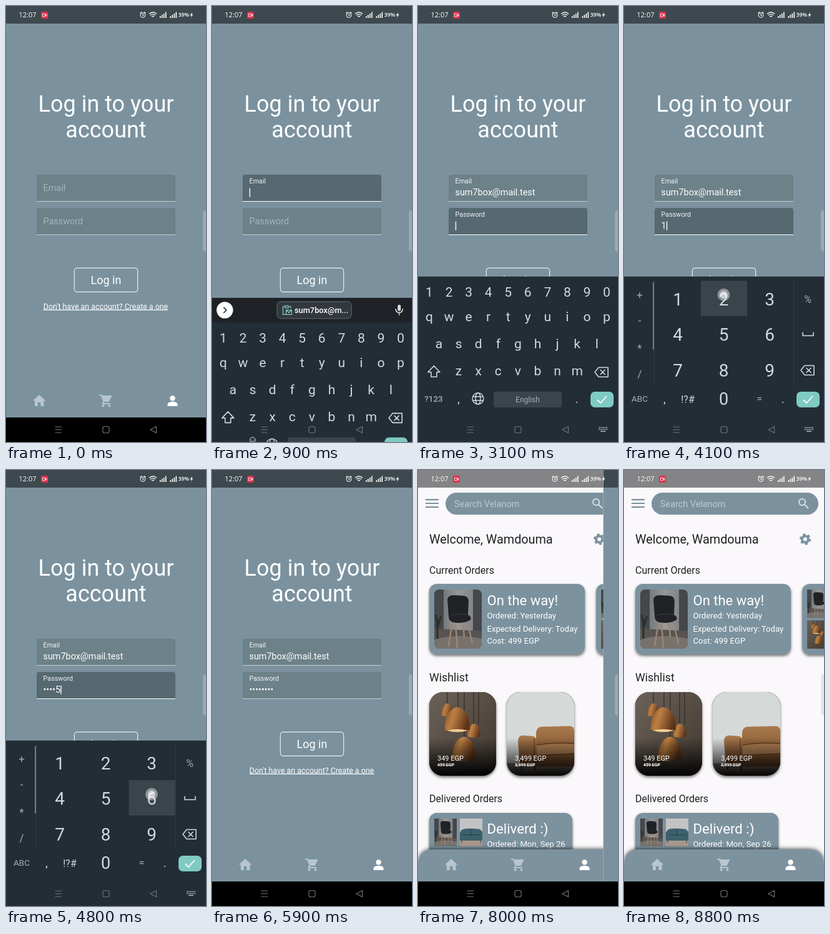
Write an HTML page that moves like this. It is 320x693 px and loops after 8.9 s.

```html
<!DOCTYPE html>
<html lang="en">
<head>
<meta charset="utf-8">
<title>Login flow</title>
<style>
  html, body { margin: 0; width: 100%; height: 100%; overflow: hidden; background: #000; }
  svg#stage { display: block; width: 100%; height: 100%; font-family: Roboto, sans-serif; }
  .mid { text-anchor: middle; }
  .key { text-anchor: middle; fill: #d3d9dd; }
  .dim { fill: #a4adb2; }
  .line { fill: none; stroke: #d3d9dd; stroke-width: 1.6; stroke-linejoin: round; stroke-linecap: round; }
</style>
</head>
<body>
<svg id="stage" viewBox="0 0 320 693" xmlns="http://www.w3.org/2000/svg">
  <defs>
    <clipPath id="wipe"><rect id="wipeRect" width="0" height="654"/></clipPath>
    <clipPath id="buttonClip"><rect x="109" y="416.500" width="102" height="38" rx="4"/></clipPath>
    <clipPath id="photoA"><rect x="26" y="190" width="76" height="94" rx="8"/></clipPath>
    <clipPath id="wishA"><rect x="18" y="353" width="107" height="133" rx="22"/></clipPath>
    <clipPath id="wishB"><rect x="142" y="353" width="108" height="133" rx="22"/></clipPath>
    <filter id="shadow" x="-20%" y="-20%" width="140%" height="140%">
      <feDropShadow dx="0" dy="2.500" stdDeviation="2.200" flood-opacity=".55"/>
    </filter>
    <filter id="navShadow" x="-10%" y="-40%" width="120%" height="180%">
      <feDropShadow dx="0" dy="-1" stdDeviation="3" flood-opacity=".65"/>
    </filter>
    <linearGradient id="fade" x2="0" y2="1">
      <stop offset=".55" stop-opacity="0"/><stop offset="1" stop-opacity=".95"/>
    </linearGradient>
    <linearGradient id="brown" x2="1" y2="1">
      <stop stop-color="#6c625a"/><stop offset="1" stop-color="#40372f"/>
    </linearGradient>
    <linearGradient id="copper" x2="1" y2=".3">
      <stop stop-color="#80501f"/><stop offset=".4" stop-color="#bd8044"/><stop offset="1" stop-color="#5e3418"/>
    </linearGradient>
    <linearGradient id="leather" x2="0" y2="1">
      <stop stop-color="#a97a4d"/><stop offset="1" stop-color="#6f4526"/>
    </linearGradient>
    <linearGradient id="wall" x2="1">
      <stop stop-color="#606367"/><stop offset=".5" stop-color="#96989a"/><stop offset="1" stop-color="#77797c"/>
    </linearGradient>
    <path id="lamp" d="M-20 17C-21 -3 -12 -18 0 -19C12 -18 21 -3 20 17Q0 24 -20 17Z"/>
    <symbol id="chair" viewBox="0 0 76 94" preserveAspectRatio="xMidYMid slice">
      <rect width="76" height="94" fill="url(#wall)"/>
      <path d="M0 0H15V64H0ZM62 0H76V66H62Z" fill="#45474b"/>
      <path d="M0 62L76 66V94H0Z" fill="#575452"/>
      <path d="M0 80Q30 69 76 78V94H0Z" fill="#78726d"/>
      <path d="M5 78V46M5 60L11 42M6 56L2 40" stroke="#29302c" stroke-width="3"/>
      <path d="M29 52L23 90M34 54L37 93M53 52L61 86M46 53L48 76" stroke="#a08570" stroke-width="2.400"/>
      <path d="M21 16Q22 8 33 9L48 10Q55 11 55 20L54 40Q60 43 58 48Q48 55 30 52Q23 50 23 42Z" fill="#202225"/>
      <path d="M28 41Q39 37 54 40" stroke="#3d4043" fill="none"/>
    </symbol>
    <symbol id="lamps" viewBox="0 0 107 133" preserveAspectRatio="xMidYMid slice">
      <rect width="107" height="133" fill="url(#brown)"/>
      <path d="M29 0V20M46 0V26M56 0V75M71 0V52M79 0V52" stroke="#292320"/>
      <g fill="url(#copper)">
        <use href="#lamp" transform="translate(29 28) scale(.46 .53)"/>
        <use href="#lamp" transform="translate(71.500 61) scale(.52 .56)"/>
        <use href="#lamp" transform="translate(55.500 90) scale(.94 1)"/>
        <use href="#lamp" transform="translate(45 43)"/>
      </g>
      <path d="M28 61Q45 66 62 61Q45 57 28 61Z" fill="#f0cd98"/>
    </symbol>
    <symbol id="sofa" viewBox="0 0 108 133" preserveAspectRatio="xMidYMid slice">
      <rect width="108" height="133" fill="#d5d9d8"/>
      <rect y="113" width="108" height="20" fill="#8b8179"/>
      <path d="M47 64Q48 55 57 55L100 54Q107 54 108 60V118H45Z" fill="url(#leather)"/>
      <path d="M46 85Q78 80 108 83V97Q78 98 46 100Z" fill="#ae7f52"/>
      <path d="M18 78Q18 68 28 69L42 70Q49 72 48 84V117H21Z" fill="url(#leather)"/>
      <path d="M48 84Q78 79 108 82M47 101L108 98M44 74V115" stroke="#5b391f" stroke-width="1.200" fill="none"/>
      <path d="M24 117V123M45 117V125" stroke="#2c211b" stroke-width="2"/>
    </symbol>
    <symbol id="blueSofa" viewBox="0 0 36 44">
      <rect width="36" height="44" fill="#c2c4c3"/><rect y="30" width="36" height="14" fill="#a8988c"/>
      <path d="M3 18Q9 14 32 17L36 21V35H0V22Z" fill="#3e606d"/>
      <path d="M4 26H33M18 18V26M3 35V39M33 35V39" stroke="#243f49"/>
    </symbol>
    <g id="backspace" class="line"><path d="M-11 0L-5 -7.500H10V7.500H-5ZM-2 -3.500L5 3.500M5 -3.500L-2 3.500"/></g>
    <g id="enter"><rect x="276" y="613" width="37" height="25" rx="7" fill="#7fcac3"/>
      <path d="M287 626L292 631L302 620" fill="none" stroke="#fff" stroke-width="1.800"/></g>
  </defs>

  <rect width="320" height="693" fill="#000"/>
  <g id="login">
    <rect width="320" height="654" fill="#7b929e"/>
    <rect width="320" height="28" fill="#3d494f"/>
    <g class="mid" fill="#fff">
      <text x="160" y="168" font-size="36">Log in to your</text>
      <text x="160" y="209" font-size="36">account</text>
      <text x="160" y="442" font-size="18">Log in</text>
      <text x="159.500" y="481.500" font-size="12.400" text-decoration="underline">Don't have an account? Create a one</text>
    </g>
    <g id="fields"></g>
    <g clip-path="url(#buttonClip)"><circle id="ripple" cx="160" cy="436" fill="#fff"/></g>
    <rect x="109.300" y="416.500" width="101.400" height="38" rx="4" fill="none" stroke="#fff"/>
  </g>

  <g id="home" clip-path="url(#wipe)">
    <rect width="320" height="654" fill="#faf8fa"/>
    <rect width="320" height="28" fill="#848385"/>
    <path d="M12 47.200H33M12 53H33M12 58.800H33" stroke="#7b929e" stroke-width="2.200"/>
    <rect x="44" y="36" width="267" height="35" rx="17.500" fill="#7b929e"/>
    <text x="58" y="58.500" font-size="14.400" fill="#bccad1">Search Velanom</text>
    <g fill="none" stroke="#d6dfe3" stroke-width="2"><circle cx="285" cy="51" r="5"/><path d="M289 55L295 61"/></g>
    <g fill="#202024">
      <text x="18" y="117" font-size="19.800">Welcome, Wamdouma</text>
      <text x="18" y="164.500" font-size="16">Current Orders</text>
      <text x="18" y="336" font-size="17.800">Wishlist</text>
      <text x="18" y="528" font-size="16">Delivered Orders</text>
    </g>
    <g transform="translate(290 110)" fill="none" stroke="#7b929e">
      <circle r="5" stroke-width="4"/><circle r="7.600" stroke-width="3" stroke-dasharray="4 3.960"/>
    </g>
    <g fill="#7b929e" filter="url(#shadow)">
      <rect x="18" y="181" width="249" height="112" rx="12"/>
      <rect x="285" y="181" width="249" height="112" rx="12"/>
      <rect x="18" y="545" width="229" height="112" rx="12"/>
    </g>
    <g clip-path="url(#photoA)"><use href="#chair" x="26" y="190" width="76" height="94"/></g>
    <use href="#chair" x="293" y="190" width="36" height="45"/>
    <use href="#lamps" x="293" y="239" width="36" height="45"/>
    <use href="#chair" x="26" y="554" width="36" height="44"/>
    <use href="#blueSofa" x="67" y="554" width="36" height="44"/>
    <g fill="#fff" font-size="13.150">
      <text x="110.500" y="215" font-size="22">On the way!</text>
      <text x="110.500" y="236">Ordered: Yesterday</text>
      <text x="110.500" y="256.500">Expected Delivery: Today</text>
      <text x="110.500" y="276">Cost: 499 EGP</text>
      <text x="110.500" y="578" font-size="22.200">Deliverd :)</text>
      <text x="110.500" y="599">Ordered: Mon, Sep 26</text>
    </g>
    <g filter="url(#shadow)">
      <rect x="18" y="353" width="107" height="133" rx="22"/>
      <rect x="142" y="353" width="108" height="133" rx="22"/>
    </g>
    <g clip-path="url(#wishA)">
      <use href="#lamps" x="18" y="353" width="107" height="133"/>
      <rect x="18" y="353" width="107" height="133" fill="url(#fade)"/>
    </g>
    <g clip-path="url(#wishB)">
      <use href="#sofa" x="142" y="353" width="108" height="133"/>
      <rect x="142" y="353" width="108" height="133" fill="url(#fade)"/>
    </g>
    <g fill="#fff" font-size="11">
      <text x="31" y="462">349 EGP</text><text x="155" y="462">3,499 EGP</text>
      <g font-size="7" font-weight="500" text-decoration="line-through">
        <text x="31" y="471">459 EGP</text><text x="155" y="471">3,999 EGP</text>
      </g>
    </g>
    <path d="M0 654V628Q0 603 25 603H295Q320 603 320 628V654Z" fill="#7b929e" filter="url(#navShadow)"/>
  </g>

  <g fill="#b9c6cd">
    <path d="M53 618L43 627.500H46V636H51V630H55.500V636H60.500V627.500H63.500Z"/>
    <path d="M149 618.500H152.500L156.500 628H164L168 620H153.500" fill="none" stroke="#b9c6cd" stroke-width="2"/>
    <path d="M154 620H168.500L164.500 628H157.500Z"/>
    <path d="M156.500 628L154.500 632H167" fill="none" stroke="#b9c6cd" stroke-width="2"/>
    <circle cx="155.500" cy="635.500" r="2"/><circle cx="165.500" cy="635.500" r="2"/>
    <g fill="#fff"><circle cx="266.500" cy="623.500" r="4.200"/><path d="M258.500 636V633Q259 629 266.500 629Q274 629 274.500 633V636Z"/></g>
  </g>

  <g fill="#fff" font-family="'Open Sans', sans-serif">
    <text x="20.500" y="18" font-size="11">12:07</text>
    <text x="275.500" y="17" font-size="8.800" font-weight="600">39%</text>
    <rect x="56" y="9" width="11" height="11" rx="2.500" fill="#e5304a"/>
    <path d="M58.500 12.500H62.500V16.500H58.500ZM63 14L65 12.800V16.200L63 15Z" fill="none" stroke="#fff" stroke-width=".8"/>
    <g fill="none" stroke="#fff" stroke-width="1.100">
      <circle cx="219" cy="14.500" r="3.800"/><path d="M219 12V15H221M214.500 11.500L217 9.500M223.500 11.500L221 9.500"/>
      <path d="M229 12.500Q235 7.500 241 12.500M231 14.800Q235 11.500 239 14.800M233 17Q235 15.500 237 17" stroke-width="1.400"/>
    </g>
    <path id="bars" d="M246 16h1.600v3h-1.600zM249 14h1.600v5h-1.600zM252 12h1.600v7h-1.600zM255 9.500h1.600v9.500h-1.600z"/>
    <use href="#bars" x="16.500"/>
    <path d="M298 9.500L294.500 15H296.800L295.600 19L299.300 13.300H297Z"/>
  </g>
  <rect x="315" y="325" width="10" height="65" rx="4" fill="#c3cbd0" opacity=".42"/>

  <g id="keyboard">
    <g id="toolbar">
      <rect y="391" width="320" height="40" fill="#1e2227"/>
      <circle cx="20.500" cy="410.500" r="13.200" fill="#fff"/>
      <path d="M18.500 406L23 410.500L18.500 415" fill="none" stroke="#33393e" stroke-width="1.800"/>
      <g id="chip">
        <rect x="104" y="397" width="119" height="27" rx="6" fill="#32383e" stroke="#646b70"/>
        <path d="M117 405H113.500V417.500H118M123 405H126V408M117 403.500H122V407H117ZM118.500 410.500H127.500V417.500H118.500ZL123 414.500L127.500 410.500" fill="none" stroke="#7fcac3" stroke-width="1.300"/>
        <text x="132" y="415.500" font-size="12.800" font-weight="500" fill="#fff">sum7box@m...</text>
      </g>
      <rect x="297" y="402" width="5" height="10" rx="2.500" fill="#d3d9dd"/>
      <path d="M294 409Q294.500 414.500 299.500 414.500Q304.500 414.500 305 409M299.500 414.500V418" class="line"/>
    </g>
    <rect y="430" width="320" height="263" fill="#222d35"/>
    <g id="letters">
      <path d="M25.500 572L16 582H21V589.500H30V582H35Z" class="line"/>
      <use href="#backspace" x="294" y="582"/>
      <text class="key dim" x="25" y="629" font-size="13.500" font-weight="500">?123</text>
      <text id="comma" class="key" x="65" font-size="18">,</text>
      <g id="smiley" fill="none" stroke="#d3d9dd" stroke-linecap="round"><circle cx="65" cy="617" r="4.500"/><path d="M63 616V615.800M67 616V615.800M62.800 618.500Q65 620.500 67.200 618.500"/></g>
      <g class="line" style="stroke-width:1.400"><circle cx="96" cy="624" r="9"/><ellipse cx="96" cy="624" rx="4" ry="9"/><path d="M88 621H104M88 627H104"/></g>
      <rect x="121" y="613" width="109" height="25" rx="3" fill="#3a444b"/>
      <text class="key dim" x="175.500" y="630" font-size="12">English</text>
      <text class="key" x="254" y="631" font-size="18">.</text>
    </g>
    <g id="numpad">
      <path d="M48.500 436V603M271.500 436V603" stroke="#303b43"/>
      <path d="M47 439V546" stroke="#727b81" stroke-width="2"/>
      <rect id="pressed" width="74" height="56" fill="#3a444b"/>
      <path d="M286 519V524H303V519" class="line"/>
      <use href="#backspace" x="294" y="579"/>
    </g>
    <use href="#enter"/>
    <path d="M289 670H303M289 673H303" stroke="#8d969b" stroke-width="2" stroke-dasharray="2 1"/>
    <path d="M292 676H300" stroke="#8d969b" stroke-width="2"/>
  </g>
  <g fill="none" stroke="#6d7377" stroke-width="1.200">
    <path d="M78.500 669H89M78.500 673.500H89M78.500 678H89"/>
    <rect x="155" y="668.500" width="10" height="10" rx="2.500"/>
    <path d="M231 673.500L240.500 668.500V678.500Z"/>
  </g>
  <g id="touch"><circle r="10" fill="#dfe4e7" opacity=".5"/><circle r="6" fill="#fff" opacity=".55"/></g>
</svg>
<script>
const LOOP = 8900;
const EMAIL = "sum7box@mail.test";
const SVG = "http://www.w3.org/2000/svg";
const $ = id => document.getElementById(id);
const show = (el, on) => el.setAttribute("visibility", on ? "inherit" : "hidden");
const within = (t, a, b) => t >= a && t < b;
const progress = (t, a, b) => Math.min(1, Math.max(0, (t - a) / (b - a)));
const easeOut = u => 1 - (1 - u) ** 3;

function add(parent, tag, attrs, text = "") {
  const el = parent.appendChild(document.createElementNS(SVG, tag));
  for (const name in attrs) el.setAttribute(name, attrs[name]);
  el.textContent = text;
  return el;
}

function keyRow(parent, chars, x, step, y, size = 21) {
  [...chars].forEach((c, i) => add(parent, "text", { class: "key", x: x + i * step, y, "font-size": size }, c));
}

keyRow($("letters"), "1234567890", 18, 31.55, 462);
keyRow($("letters"), "qwertyuiop", 18, 31.55, 501);
keyRow($("letters"), "asdfghjkl", 33.5, 31.6, 544);
keyRow($("letters"), "zxcvbnm", 65, 31.6, 587);
["123", "456", "789"].forEach((row, i) => keyRow($("numpad"), row, 86, 73.5, 476 + 56.3 * i, 28));
keyRow($("numpad"), "0", 159.5, 0, 634, 27);
for (const [label, x, y, size] of [
  ["+", 25, 465, 17], ["-", 25, 506, 17], ["*", 25, 550, 17], ["/", 25, 591, 17],
  ["%", 294, 472, 16], ["ABC", 25, 629, 13.5], ["=", 217, 630, 16]
]) add($("numpad"), "text", { class: "key dim", x, y, "font-size": size }, label);
for (const [label, x, size] of [[",", 65, 18], ["!?#", 102, 16], [".", 254, 18]])
  add($("numpad"), "text", { class: "key", x, y: 631, "font-size": size }, label);

function makeField(name, top) {
  const box = $("fields");
  const back = add(box, "path", { d: `M49 ${top + 43}V${top + 4}q0 -4 4 -4H267q4 0 4 4V${top + 43}Z` });
  const rule = add(box, "rect", { x: 49, y: top + 42, width: 222, height: 1 });
  const label = add(box, "text", {}, name);
  const value = add(box, "text", { x: 59.5, y: top + 33, "font-size": 14.4, fill: "#fff" });
  const caret = add(box, "rect", { y: top + 21.5, width: 1.4, height: 14, fill: "#fff" });
  return (focused, lift, text, caretOn) => {
    back.setAttribute("fill", focused ? "#566870" : "#6c8188");
    rule.setAttribute("fill", focused ? "#fff" : "#c3ced2");
    label.setAttribute("x", 59.5);
    label.setAttribute("y", top + 26 - 12 * lift);
    label.setAttribute("font-size", 14.4 - 3.6 * lift);
    label.setAttribute("fill", lift > 0.5 ? "#f1f4f5" : "#a6b5bc");
    value.textContent = text;
    caret.setAttribute("x", 59.8 + (text ? value.getComputedTextLength() : 0));
    show(caret, focused && caretOn);
  };
}
const drawEmail = makeField("Email", 268);
const drawPassword = makeField("Password", 321);

// start, end, x, y
const taps = [
  [390, 560, 160, 289], [1640, 1800, 165, 411], [2650, 2800, 165, 343],
  [3300, 3450, 26, 622], [5210, 5340, 294, 625], [6650, 6820, 160, 436]
];
const commitTime = i => 3980 + 168 * i;
const digitTaps = Array.from({ length: 8 }, (_, i) => [
  commitTime(i) - 110, commitTime(i), 86 + 73.5 * (i % 3), 459 + 56.3 * Math.floor(i / 3)
]);

function draw(t) {
  const typed = digitTaps.filter(tap => t >= tap[1]).length;
  const emailFocus = within(t, 500, 2750);
  const passFocus = within(t, 2750, 5450);
  const blink = start => Math.floor((t - start) / 500) % 2 === 0;
  drawEmail(emailFocus, easeOut(progress(t, 500, 700)), t >= 1850 ? EMAIL : "", blink(t >= 1850 ? 1850 : 700));
  const masked = typed && t < 5450 ? "•".repeat(typed - 1) + typed : "•".repeat(typed);
  drawPassword(passFocus, easeOut(progress(t, 2750, 2900)), masked, typed > 0 || blink(2750));

  const raised = easeOut(progress(t, 750, 1150)) - progress(t, 5450, 5850) ** 2;
  $("keyboard").setAttribute("transform", `translate(0 ${302 * (1 - raised)})`);
  show($("keyboard"), raised > 0);
  show($("toolbar"), t < 2900);
  show($("chip"), t < 2150);
  show($("smiley"), t < 2900);
  $("comma").setAttribute("y", t < 2900 ? 632 : 631);
  show($("letters"), t < 3480);
  show($("numpad"), t >= 3480);

  const press = digitTaps.find(([a, b]) => within(t, a, b));
  show($("pressed"), t >= 3480 && press);
  if (press) {
    $("pressed").setAttribute("x", press[2] - 36.5);
    $("pressed").setAttribute("y", press[3] - 22.3);
  }
  const tap = press || taps.find(([a, b]) => within(t, a, b));
  show($("touch"), tap);
  if (tap) $("touch").setAttribute("transform", `translate(${tap[2]} ${tap[3]})`);

  $("ripple").setAttribute("r", 60 * easeOut(progress(t, 6680, 7000)));
  $("ripple").setAttribute("opacity", 0.18 * (1 - progress(t, 6950, 7350)));
  $("wipeRect").setAttribute("width", 320 * easeOut(progress(t, 7600, 8290)));
}

const start = performance.now();
function tick() {
  draw((performance.now() - start) % LOOP);
  requestAnimationFrame(tick);
}
tick();
</script>
</body>
</html>
```
